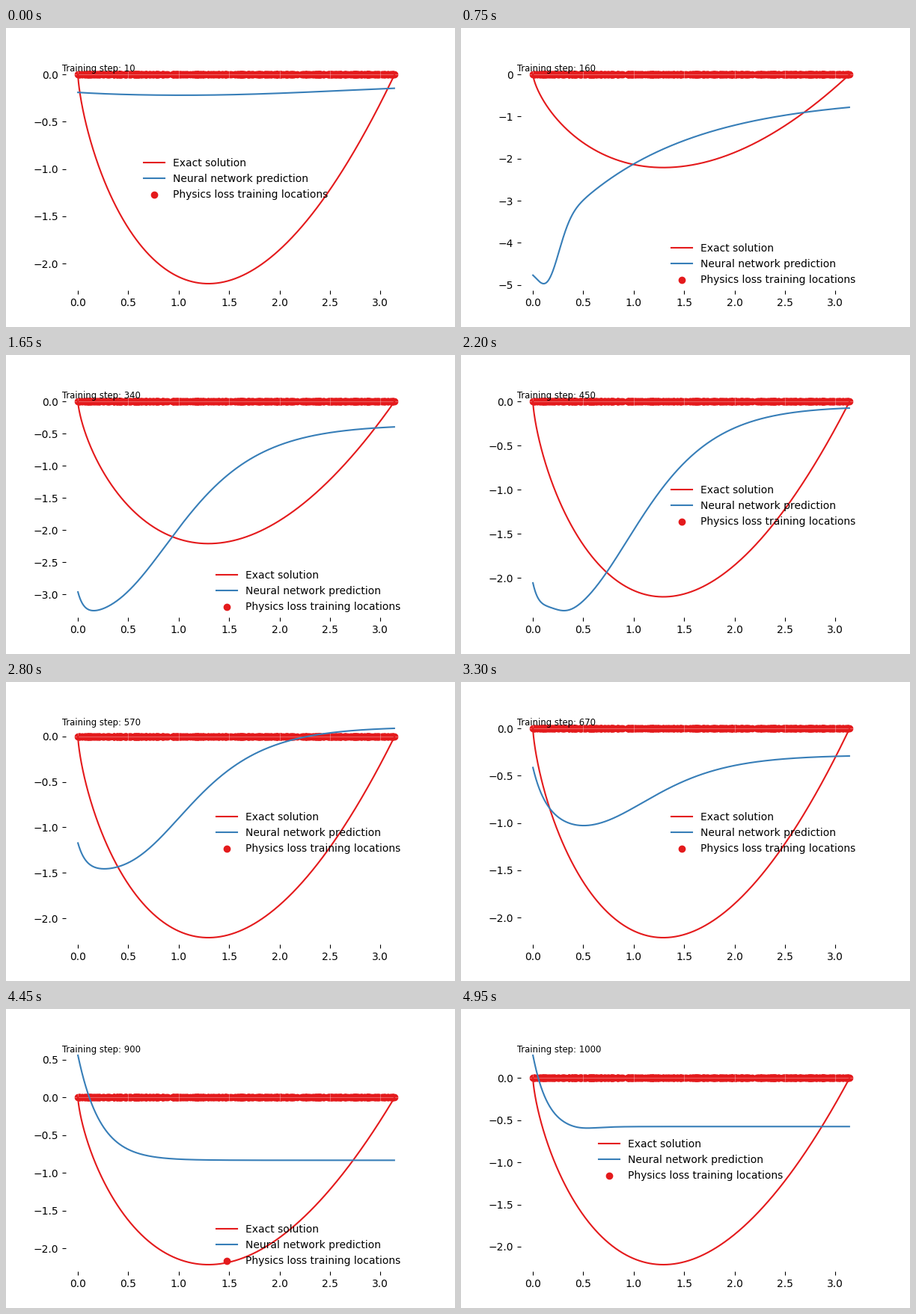
A matplotlib script that plays this animation: 600 by 400 pixels, repeating every 5000 ms.

```python
import matplotlib.pyplot as plt
import numpy as np
from matplotlib.animation import FuncAnimation

FRAMES, INTERVAL = 100, 50
RED, BLUE = "#e41a1c", "#377eb8"
X_END = 3.138
LEGEND_SPOTS = [(0, "center"), (7, "lower right"), (40, "center right"),
                (73, "lower right"), (96, "center")]

xs = X_END * np.linspace(0, 1, 600) ** 1.5
exact_ys = xs**.7 * (xs - np.pi)


def pose(top, rise=0, mid=1, width=1, spike=0, decay=1, dip=0):
    """A skewed S-curve up to top, with a decaying spike and a dip at the left."""
    s_curve = np.exp(-np.exp(-(xs - mid) / width))
    return (top - rise * (1 - s_curve)
            + spike * np.exp(-xs / decay)
            - dip * np.exp(-((xs - .145) / .165) ** 2))


def hermite(t, knots, values):
    """Smooth path through the rows of values at the given knots."""
    slopes = np.gradient(values, knots, axis=0)
    i = np.clip(np.searchsorted(knots, t, side="right") - 1, 0, len(knots) - 2)
    h = (knots[i + 1] - knots[i])[:, None]
    u = (t - knots[i])[:, None] / h
    return ((2 * u**3 - 3 * u**2 + 1) * values[i]
            + (u**3 - 2 * u**2 + u) * h * slopes[i]
            + (3 * u**2 - 2 * u**3) * values[i + 1]
            + (u**3 - u**2) * h * slopes[i + 1])


# Shape of the prediction at a few moments of the training.
poses = {
    0: pose(-.072, rise=.16, mid=2.6, width=1.2, spike=.041, decay=.6),
    15: pose(-.52, spike=-3.75, decay=1.18, dip=1.08),
    33: pose(-.36, rise=2.98, mid=.87, width=.52, spike=.36, decay=.06),
    56: pose(.107, rise=1.59, mid=1, width=.48, spike=.31, decay=.08),
    77: pose(-.76, rise=.15, mid=1.4, width=.5, spike=1.16, decay=.21),
    89: pose(-.832, spike=1.388, decay=.22),
    99: pose(-.576, rise=.06, mid=.57, width=.13, spike=.904, decay=.15),
}
predictions = hermite(np.arange(FRAMES), np.array(list(poses)),
                      np.array(list(poses.values())))

rng = np.random.default_rng(7)
spots = np.concatenate([[0, X_END], rng.uniform(0, X_END, 400)])

fig, ax = plt.subplots(figsize=(6, 4), dpi=100)
ax.plot(xs, exact_ys, color=RED, label="Exact solution")
prediction, = ax.plot(xs, predictions[0], color=BLUE, label="Neural network prediction")
ax.scatter(spots, np.zeros_like(spots), color=RED,
           label="Physics loss training locations")
ax.set_xlim(-.05 * X_END, 1.05 * X_END)
ax.grid(color="white", alpha=.3, linewidth=.8)
ax.tick_params(direction="in")
ax.spines[:].set_visible(False)
step_text = ax.text(0, 1, "", transform=ax.transAxes, va="top", fontsize="small")
legend = ax.legend(loc="center", frameon=False)


def update(frame):
    ys = predictions[frame]
    prediction.set_ydata(ys)
    low, high = min(exact_ys.min(), ys.min()), max(0, ys.max())
    pad = .05 * (high - low)
    ax.set_ylim(low - pad, high + pad)
    step_text.set_text(f"Training step: {10 * (frame + 1)}")
    legend.set_loc([spot for start, spot in LEGEND_SPOTS if start <= frame][-1])
    return prediction, step_text, legend


anim = FuncAnimation(fig, update, frames=FRAMES, interval=INTERVAL,
                     repeat=True, repeat_delay=0)
plt.show()
```
